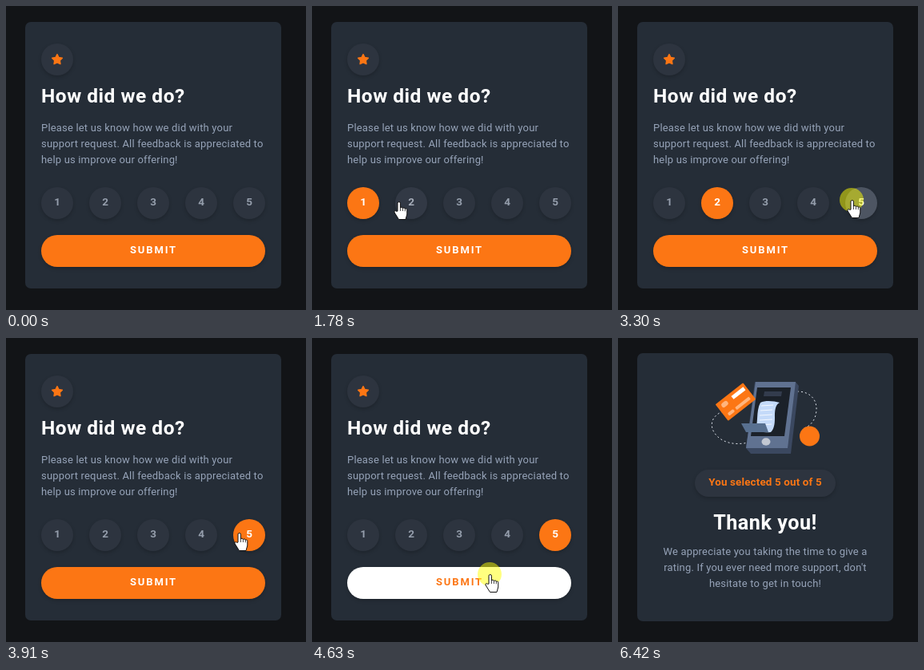
Write an HTML page that moves like this. It is 375 by 381 pixels and loops after 8.82 s.

```html
<!DOCTYPE html>
<html lang="en">
<head>
<meta charset="utf-8">
<title>Rating card</title>
<style>
  html, body { margin: 0; width: 100%; height: 100%; overflow: hidden; background: #121417; }
  svg { display: block; width: 375px; height: 381px; font-family: Roboto, sans-serif; }
  .card { fill: #252d37; }
  .chip { fill: #2d343f; }
  .raised { filter: drop-shadow(0 2px 2px rgba(0, 0, 0, .2)); }
  .title { font-size: 24.5px; font-weight: 700; letter-spacing: .5px; fill: #fff; }
  .title.mid { font-size: 25.2px; }
  .copy { font-size: 13px; letter-spacing: .18px; fill: #96a3b8; }
  .digit { font-size: 13.5px; font-weight: 700; }
  .submit { font-size: 13px; font-weight: 700; letter-spacing: 1.85px; }
  .result { font-size: 13.4px; font-weight: 700; letter-spacing: .15px; fill: #fc7614; }
  .mid { text-anchor: middle; }
  .dots { fill: none; stroke: #dfe4ec; stroke-dasharray: 2 3; }
  .cursor { fill: #fff; stroke: #111; stroke-linejoin: round; }
</style>
</head>
<body>
<svg viewBox="0 0 375 381">
  <g id="ask">
    <rect class="card" x="24" y="20" width="320" height="334" rx="7"/>
    <circle class="chip raised" cx="64" cy="67" r="20"/>
    <path id="star" fill="#fc7614" stroke="#fc7614" stroke-width="1.4" stroke-linejoin="round"/>
    <text class="title" x="44" y="121">How did we do?</text>
    <g class="copy">
      <text x="44" y="157">Please let us know how we did with your</text>
      <text x="44" y="177">support request. All feedback is appreciated to</text>
      <text x="44" y="197">help us improve our offering!</text>
    </g>
    <g id="ratings"></g>
    <rect id="button" class="raised" x="44" y="287" width="280" height="40" rx="20"/>
    <text id="label" class="submit" x="155" y="310">SUBMIT</text>
  </g>

  <g id="thanks">
    <rect class="card" x="24" y="19" width="320" height="336" rx="7"/>
    <path class="dots" d="M131 92C118 97 114 108 120 118C128 131 145 135 163 131"/>
    <path class="dots" d="M224 67C240 67 249 77 248 91C247 102 242 109 233 113"/>
    <!-- terminal -->
    <path fill="#3b4860" d="M171 55H222L226 60L216 145H166L160 138Z"/>
    <path fill="#607291" d="M172 55H222L212 138H160Z"/>
    <path fill="#1b2129" d="M174 62H216L208 123H166Z"/>
    <path fill="#333c4d" d="M183 67H205L204 73H182Z"/>
    <ellipse cx="185" cy="130" rx="5.5" ry="4.7" fill="#c3c8d2"/>
    <!-- receipt and tray -->
    <path fill="#c4daf9" d="M178 81C184 78 195 79 202 81C196 84 196 92 196 100C196 108 195 114 191 118Q180 119 171 116C176 108 172 92 178 81Z"/>
    <path fill="none" stroke="#f4f8ff" d="M179 85L194 84M178 91L193 90M177 97L193 96M177 103L193 102M176 109L192 108"/>
    <path fill="#587090" d="M154 107H184L188 118H160Z"/>
    <!-- bank card -->
    <g transform="translate(147 80) rotate(-38)">
      <rect x="-22" y="-13" width="44" height="26" rx="1" fill="#fc7614"/>
      <rect x="0" y="-9" width="19" height="5" fill="#fff"/>
      <g fill="#ffb57e">
        <rect x="-17" y="-9" width="9" height="6" rx="2.5"/>
        <rect x="-17" y="5" width="9" height="4" rx="1.5"/>
        <rect x="-5" y="5" width="22" height="4" rx="1"/>
      </g>
    </g>
    <circle cx="239.5" cy="123" r="12.5" fill="#fc7614"/>
    <rect class="chip raised" x="96" y="165" width="176" height="34" rx="17"/>
    <text class="result mid" x="184" y="185">You selected 5 out of 5</text>
    <text class="title mid" x="184" y="240">Thank you!</text>
    <g class="copy mid">
      <text x="184" y="272">We appreciate you taking the time to give a</text>
      <text x="184" y="292">rating. If you ever need more support, don't</text>
      <text x="184" y="312">hesitate to get in touch!</text>
    </g>
  </g>

  <circle id="click" r="15" fill="#ff0" fill-opacity=".5"/>
  <g id="pointer" class="cursor">
    <path id="arrow" d="M.5 .5V16.5L4.2 13L6.7 18.5L9 17.5L6.6 12H11.5Z"/>
    <g id="hand">
      <path d="M-1 12V2.2a1.7 1.7 0 0 1 3.4 0V8a1.6 1.6 0 0 1 3 .6a1.6 1.6 0 0 1 2.9 .7a1.5 1.5 0 0 1 2.5 1.2V16L9 22.5H.5L-4.8 14c-1.2-2 1.3-3.2 2.6-1.5Z"/>
      <path fill="none" stroke-width=".8" d="M2.4 8v4M5.4 8.6v3.4M8.3 9.3v3"/>
    </g>
  </g>
</svg>
<script>
const LOOP = 8820, ENTER = 390, THANKS = 4890, EXIT = 6420;
const FADE = 200, STEP = 66.7, LEAD = 30, SETTLE = 130;
const $ = id => document.getElementById(id);
const clamp = u => Math.min(1, Math.max(0, u));
const easeOut = (u, power) => 1 - (1 - clamp(u)) ** power;
const mix = (a, b, u) => a.map((v, i) => v + (b[i] - v) * u);

// The pointer glides to each stop, then clicks there.
const entry = [415, 333];
const stops = [
  { start: 350, end: 1050, at: [74, 245], press: 1250, release: 1450 },
  { start: 1600, end: 2050, at: [132, 245], press: 2250, release: 2450 },
  { start: 2740, end: 3110, at: [292, 243], press: 3300, release: 3570 },
  { start: 3900, end: 4370, at: [222, 296], press: 4630, release: THANKS },
  { start: 6250, end: EXIT, at: [259, 354] }
];

const pointerAt = t => stops.reduce((from, { start, end, at }) =>
  mix(from, at, easeOut((t - start) / (end - start), 3)), entry);

// The screen refreshes in steps counted back from the moment it comes to rest.
const rests = stops.flatMap(s => [s.end, s.release + SETTLE]);
function refreshed(t) {
  const rest = rests.find(r => r >= t) ?? LOOP;
  return rest - Math.ceil((rest - t) / STEP) * STEP;
}

// Colours as [fill, text]
const white = [255, 255, 255], orange = [252, 118, 20];
const idle = [[45, 52, 63], [149, 158, 172]];
const hover = [[77, 85, 98], white];
const chosen = [orange, white];
const inverted = [white, orange];

function add(tag, attrs) {
  const node = document.createElementNS('http://www.w3.org/2000/svg', tag);
  for (const key in attrs) node.setAttribute(key, attrs[key]);
  return $('ratings').appendChild(node);
}

const targets = Array.from({ length: 5 }, (_, i) => {
  const cx = 64 + 60 * i, cy = 247, r = 20;
  const shape = add('circle', { class: 'raised', cx, cy, r });
  const text = add('text', { class: 'digit mid', x: cx, y: 249.7 });
  text.textContent = i + 1;
  return {
    shape, text, track: [[0, idle]],
    hit: ([x, y]) => Math.hypot(x - cx, y - cy) < r,
    style: (over, picked) => picked ? chosen : over ? hover : idle
  };
});
targets.push({
  shape: $('button'), text: $('label'), track: [[0, chosen]],
  hit: ([x, y]) => x > 44 && x < 324 && y > 287 && y < 327,
  style: over => over ? inverted : chosen
});

// Follow the pointer once and note when each target changes its look.
let picked;
for (let t = ENTER; t < THANKS - LEAD; t += 5) {
  const over = targets.find(target => target.hit(pointerAt(t)));
  if (stops.some(s => s.release - LEAD === t)) picked = over;
  for (const target of targets) {
    const look = target.style(target === over, target === picked);
    if (look !== target.track.at(-1)[1]) target.track.push([t, look]);
  }
}

function paint({ shape, text, track }, t) {
  const [fill, ink] = track.reduce((now, [start, look]) => {
    const u = easeOut((t - start) / FADE, 2);
    return now.map((c, i) => mix(c, look[i], u));
  }, track[0][1]).map(c => `rgb(${c.map(Math.round)})`);
  shape.setAttribute('fill', fill);
  text.setAttribute('fill', ink);
}

$('star').setAttribute('d', 'M' + Array.from({ length: 10 }, (_, i) => {
  const r = i % 2 ? 3.5 : 6.7, a = i * Math.PI / 5;
  return `${64 + r * Math.sin(a)} ${67.3 - r * Math.cos(a)}`;
}).join('L') + 'Z');

const show = (node, on) => { node.style.display = on ? '' : 'none'; };

function render(t) {
  const asking = t < THANKS, shown = refreshed(t);
  show($('ask'), asking);
  show($('thanks'), !asking);
  targets.forEach(target => paint(target, shown));

  const spot = pointerAt(shown).map(Math.round);
  const active = asking && targets.some(target => target.hit(spot));
  for (const id of ['pointer', 'click']) $(id).setAttribute('transform', `translate(${spot})`);
  show($('pointer'), t >= ENTER && t < EXIT);
  show($('hand'), active);
  show($('arrow'), !active);
  show($('click'), stops.some(s => t >= s.press && t < s.release));
}

const origin = performance.now();
function frame() {
  render((performance.now() - origin) % LOOP);
  requestAnimationFrame(frame);
}
frame();
</script>
</body>
</html>
```
